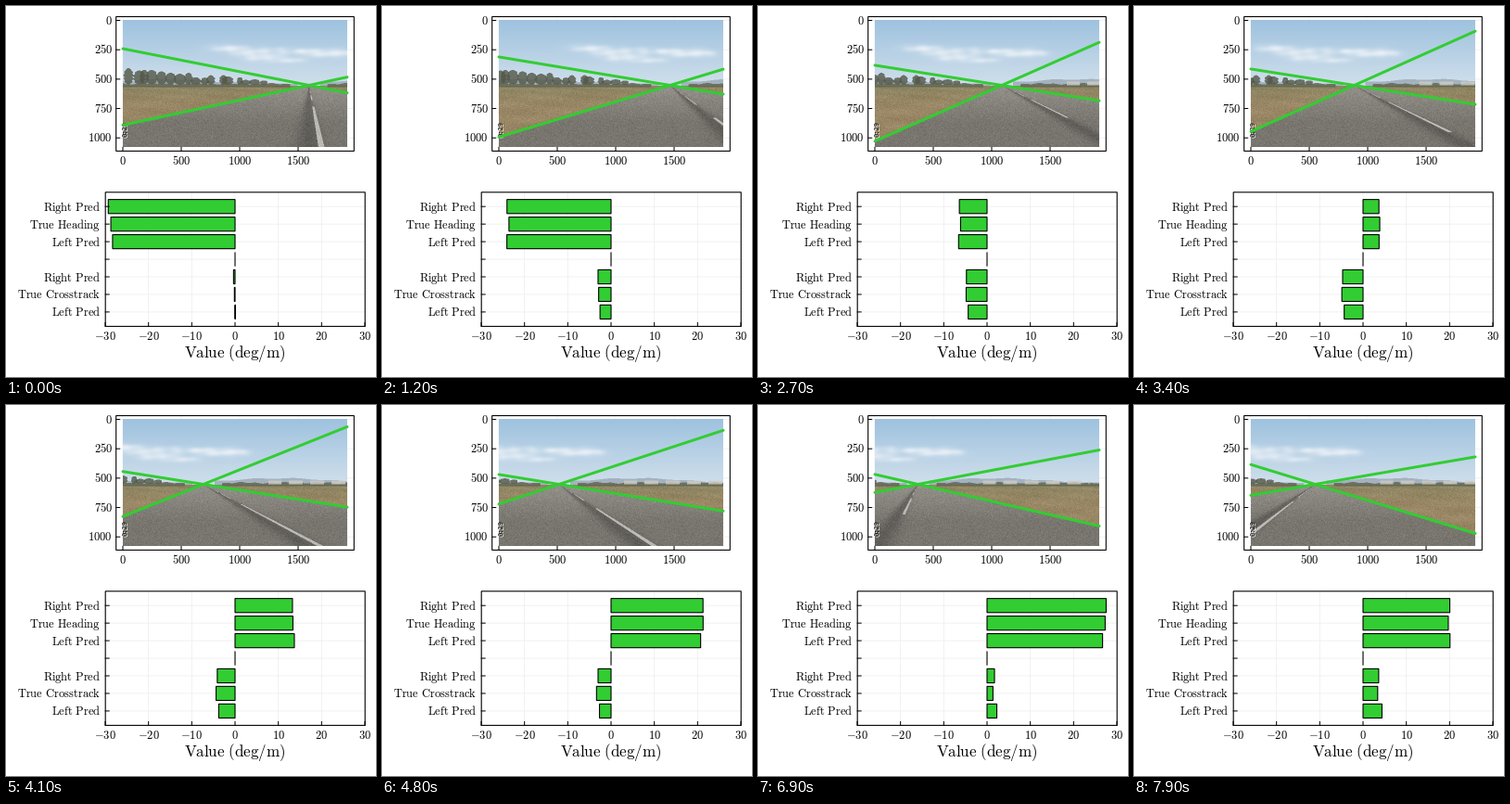
These frames come from a looping animation (399x400 px, 8 s). A matplotlib script:

```python
import numpy as np
import matplotlib.pyplot as plt
from matplotlib.animation import FuncAnimation
from matplotlib.patches import Rectangle

plt.rcParams["mathtext.fontset"] = "cm"
plt.rcParams["path.snap"] = False

W, H, DPI = 399, 400, 100
FRAMES, STEP = 80, 100
PT = 72 / DPI
GREEN = "#32cd32"

# Camera view rectangle, horizon and pinhole camera (pixels, metres)
X0, X1, Y0, Y1 = 126, 368, 15, 152
HORIZON, CENTER, FOCAL = 85.5, 247.3, 145
CAM_H, HALF_ROAD, SPEED = 2.5, 10.7, 4.5

# Bar chart: zero position, pixels per unit, first row, row spacing
ZERO, UNIT, ROW0, ROW_STEP = 247, 14 / 3, 216.2, 18.95
BAR_H = 0.8 * ROW_STEP


# ---- motion ----------------------------------------------------------------

def pose(t):
    """True heading (deg) and crosstrack (m) on a weaving path."""
    phase = 0.5 * (t - 3.13)
    return 28.7 * np.sin(phase), -0.12 - 4.82 * np.cos(phase)


def bar_values(t):
    """Bar lengths from the top row down; predictions wander around the truth."""
    head, cross = pose(t)
    return [head - 0.6 + 0.12 * t, head, head - 0.1 + 0.5 * np.cos(3.2 * t), 0,
            cross + 0.1 - 0.3 * np.cos(0.54 * t), cross, cross + 0.2 + 0.1 * t]


def project(t):
    """Vanishing point x and sideways run per row of left edge, middle, right edge."""
    head, cross = pose(t)
    yaw = np.radians(head)
    side = np.array([-HALF_ROAD, 0, HALF_ROAD]) + 0.3 - 0.985 * cross
    return CENTER - FOCAL * np.tan(yaw), side / (CAM_H * np.cos(yaw))


# ---- camera view -----------------------------------------------------------

SS = 2  # supersampling
gx, gy = np.meshgrid(np.arange(X0, X1, 1 / SS) + 0.5 / SS,
                     np.arange(Y0, Y1, 1 / SS) + 0.5 / SS)
rng = np.random.default_rng(4)
grain = rng.normal(size=(Y1 - Y0, X1 - X0))
puffs = [(cx, 51 + rng.normal(0, 3.5), rng.uniform(8, 20), rng.uniform(2.5, 5))
         for cx in np.linspace(-90, 42, 14)]
trees = [(cx + rng.uniform(-3, 3), rng.uniform(3, 6.5),
          rng.uniform(0.6, 1) * (4 - cx / 14)) for cx in np.linspace(-195, -48, 17)]


def paint(img, color, mask):
    img += (np.array(color, float) - img) * np.asarray(mask, float)[..., None]


def ramp(low, high, f):
    f = np.clip(f, 0, 1)[..., None]
    return np.array(low, float) * (1 - f) + np.array(high, float) * f


def scene(t, vx, runs):
    dx, dy = gx - vx, gy - HORIZON
    depth = np.maximum(dy, 0.4)

    # Sky, clouds and far hills
    img = ramp((158, 194, 223), (208, 223, 235), (gy - Y0) / (HORIZON - Y0))
    wave = 1 + 0.3 * np.sin(dx / 4.3 + gy / 3) * np.sin(dx / 9.1 - gy / 2.2)
    for cx, cy, sx, sy in puffs:
        blob = np.exp(-((dx - cx) / sx) ** 2 - ((gy - cy) / sy) ** 2)
        paint(img, (241, 245, 249), np.clip(0.5 * blob * wave, 0, 1))
    ridge = 4 + 2.5 * np.sin(dx / 38 - 0.6) + 0.5 * np.sin(dx / 7)
    paint(img, (160, 174, 187), 0.9 * ((np.abs(dx) > 12) & (dy > -ridge) & (dy < 1)))

    # Grass and asphalt
    ground = dy > 0.5
    patch = 0.5 + 0.5 * np.sin(dx / 17 + 60 / (depth + 4)) * np.sin(dy / 2.6)
    grass = ramp((146, 139, 104), (158, 140, 106), dy / 20) - 10 * patch[..., None]
    img[ground] = grass[ground]
    road = ground & (dx > runs[0] * dy) & (dx < runs[2] * dy)
    asphalt = ramp((148, 145, 139), (121, 118, 112), dy / 40)
    img[road] = asphalt[road]

    # Tyre marks and centre line, in road perspective
    across = dx / depth - runs[1]
    paint(img, (76, 74, 71), road * 0.55 * np.exp(-((across + 0.2) / 0.25) ** 2))
    ahead = CAM_H * FOCAL / depth + SPEED * t
    dash = (np.abs(across) < 0.05) & ((ahead - 2.8) % 19.7 < 13) & (dy > 5)
    paint(img, (188, 186, 181), road & dash)

    # Tree line on the left, hedge and low buildings on the right
    for cx, half, h in trees:
        u = (dx - cx) / (half * (1 + 0.12 * np.sin(gy * 1.7 + cx)))
        crown = (u ** 2 + ((dy + h * 0.55) / (h * 0.5)) ** 2) < 1
        paint(img, (82, 86, 70), 0.8 * crown)
    hedge = 1.6 + 0.9 * np.sin(dx / 3.7) * np.sin(dx / 8.3)
    paint(img, (94, 97, 77), 0.8 * ((np.abs(dx) > 20) & (dy > -hedge) & (dy < 2)))
    halls = (dx > 70) & (dx < 185) & (dx % 23 < 15) & (np.abs(dy + 2) < 1.8)
    paint(img, (205, 205, 198), 0.8 * halls)

    small = img.reshape(Y1 - Y0, SS, X1 - X0, SS, 3).mean(axis=(1, 3))
    below = np.arange(Y0, Y1)[:, None] + 0.5 - HORIZON
    rough = np.roll(grain, int(t * 70), axis=1) * np.clip(below / 4, 0, 1) * 5
    return np.clip(small + rough[..., None], 0, 255).astype(np.uint8)


# ---- static parts ----------------------------------------------------------

fig = plt.figure(figsize=(W / DPI, H / DPI), dpi=DPI, facecolor="white")
ax = fig.add_axes([0, 0, 1, 1])
ax.axis("off")


def label(x, y, s, ha, size=12.55):
    body = s.replace(" ", r"\ ")
    ax.text(x, y, rf"$\mathrm{{{body}}}$", fontsize=size * PT, ha=ha,
            va="baseline", color="black")


def line(xs, ys, color="black", width=1.0, z=5, **kw):
    return ax.plot(xs, ys, color=color, lw=width * PT, zorder=z, **kw)[0]


def panel(x0, y0, x1, y1, xticks, yticks):
    for x in xticks:
        line([x, x], [y0, y1], "#eeeeee", 0.8, 1)
        line([x, x], [y1 - 4, y1])
    for y in yticks:
        line([x0, x1], [y, y], "#eeeeee", 0.8, 1)
        line([x0, x0 + 4], [y, y])
    ax.add_patch(Rectangle((x0, y0), x1 - x0, y1 - y0, fill=False,
                           ec="black", lw=1.1 * PT, zorder=5))


xs = [X0 + 0.126 * v for v in range(0, 1501, 500)]
ys = [Y0 + 0.5 + 0.1267 * v for v in range(0, 1001, 250)]
panel(118.7, 11.5, 375.3, 156.4, xs, ys)
for i, x in enumerate(xs):
    label(x, 171, str(500 * i), "center")
for i, y in enumerate(ys):
    label(115, y + 4.3, str(250 * i), "right")

ticks = range(-30, 31, 10)
rows = [ROW0 + ROW_STEP * i for i in range(7)]
panel(107.2, 200.8, 387.2, 345.4, [ZERO + UNIT * v for v in ticks], rows)
for v in ticks:
    label(ZERO + UNIT * v, 360.3, str(v), "center")
names = ["Right Pred", "True Heading", "Left Pred", "",
         "Right Pred", "True Crosstrack", "Left Pred"]
for name, y in zip(names, rows):
    if name:
        label(102, y + 4.5, name, "right")
label(ZERO, 379, "Value (deg/m)", "center", 17)

# ---- moving parts ----------------------------------------------------------

view = ax.imshow(np.zeros((Y1 - Y0, X1 - X0, 3), np.uint8),
                 extent=(X0, X1, Y1, Y0), interpolation="nearest",
                 aspect="auto", zorder=2)
for shift, color in ((0.7, "white"), (0, "black")):
    ax.text(128.5 + shift, 132.5 + shift, "0:29", rotation=90, color=color,
            fontsize=7 * PT, ha="center", va="center", zorder=3,
            family="DejaVu Sans Mono")
edges = [line([], [], GREEN, 3, 4, solid_capstyle="round") for _ in range(2)]
bars = [ax.add_patch(Rectangle((ZERO, y - BAR_H / 2), 0, BAR_H, fc=GREEN,
                               ec="black", lw=1.1 * PT, zorder=3))
        for y in rows]
ax.set_xlim(0, W)
ax.set_ylim(H, 0)


def draw(frame):
    t = frame * STEP / 1000
    vx, runs = project(t)
    view.set_data(scene(t, vx, runs))
    ends = np.array([X0, X1])
    for edge, run in zip(edges, (runs[0], runs[2])):
        edge.set_data(ends, HORIZON + (ends - vx) / run)
    for bar, v in zip(bars, bar_values(t)):
        bar.set_width(np.clip(v, -30, 30) * UNIT)
    return [view, *edges, *bars]


anim = FuncAnimation(fig, draw, frames=FRAMES, interval=STEP, repeat=True,
                     repeat_delay=0, blit=False)
plt.show()
```
